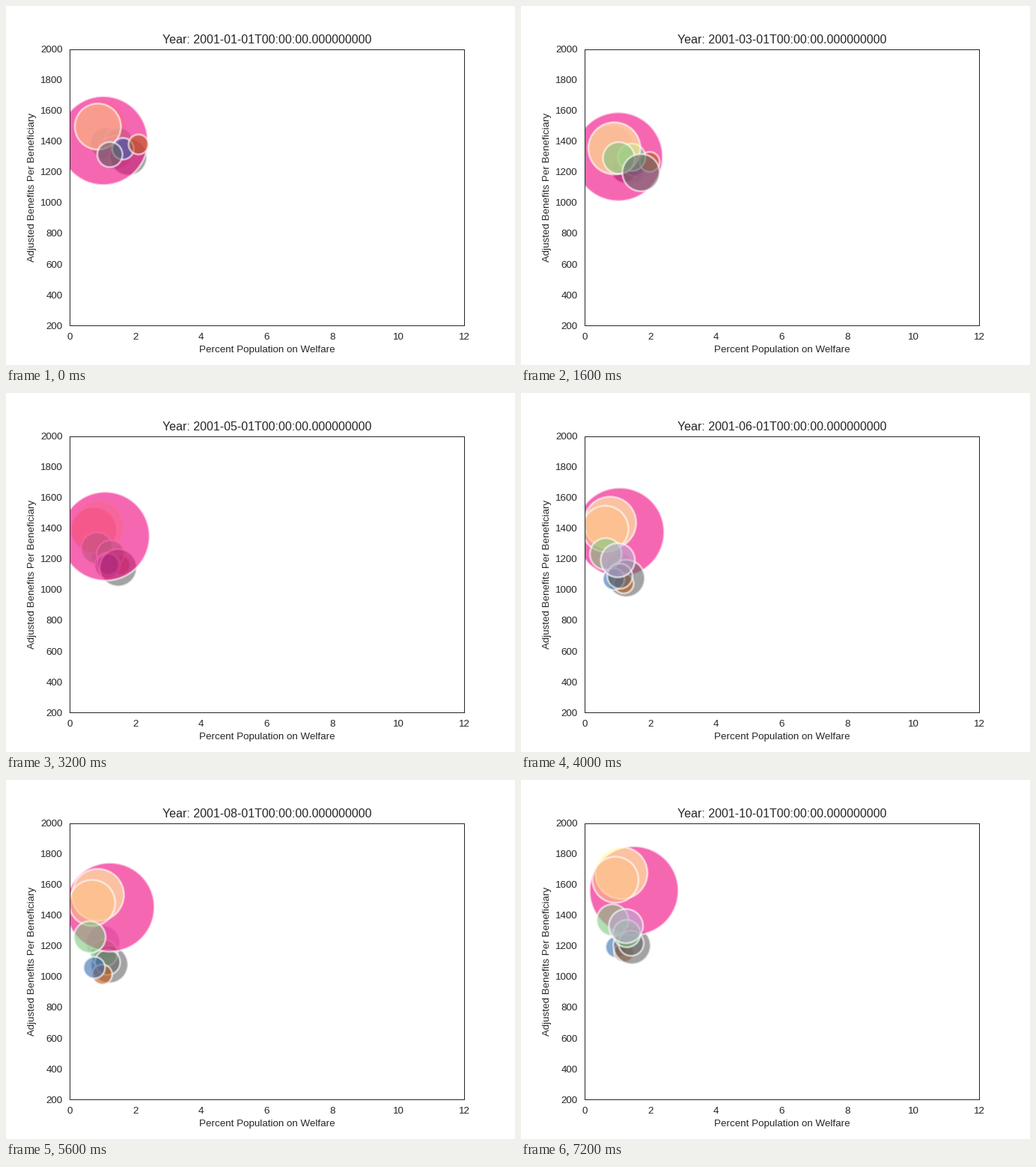
Animation, 680 px wide and 480 px high, one loop 8000 ms. Source, as a matplotlib script:

```python
import numpy as np
import matplotlib.pyplot as plt
from matplotlib.animation import FuncAnimation

W, H, DPI = 680, 480, 96
INK = "#262626"

plt.rcParams.update({
    "font.family": "Liberation Sans",
    "text.color": INK,
    "axes.labelcolor": INK,
    "axes.edgecolor": INK,
    "axes.linewidth": 0.75,
})

# key: radius, start (x, y), slide (dx, dy), share of the lead's vertical motion.
# Colours are spread over the Accent map in this order.
BUBBLES = {
    "G": (21.2, (134, 183), (-33, 30), 0.8),
    "H": (18.3, (151, 180), (-31, 51), 0.8),
    "V": (22.8, (146, 196), (-27, 25), 0.8),
    "O": (30.8, (123, 161), (-18, 14), 1.3),
    "Y": (34.8, (126, 162), (-13, 4), 1.3),
    "B": (14.4, (157, 190), (-51, 59), 0.8),
    "P": (59.4, (130, 180), (0, 0), 1.0),
    "N": (13.3, (178, 184), (-62, 72), 0.8),
    "K": (24.9, (164, 201), (-37, 46), 0.8),
    "D": (16.8, (139, 198), (-13, 46), 0.8),
}
COLORS = dict(zip(BUBBLES, plt.get_cmap("Accent")(np.linspace(0, 1, len(BUBBLES)))))

# Path of the largest bubble, which the others follow.
LEAD_MONTHS = [1, 2, 4, 6, 8, 9, 10]
LEAD_X = [130, 127, 133, 132, 139, 143, 151]
LEAD_Y = [180, 206, 197, 186, 170, 204, 148]

# Stacking per month, bottom to top.
ORDERS = [
    "YGHVKPOBND", "VDOBPNHYGK", "VDOBPNHYGK", "VYOGNHDBKP", "VYOGNHDBKP",
    "HPKNYOGBDV", "HPKNYOGBDV", "VKHDPYOGNB", "NBYOGHVKPD", "BNKPDYOGHV",
]

fig, ax = plt.subplots(figsize=(W / DPI, H / DPI), dpi=DPI)
ax.set(xlim=(0, 12), ylim=(200, 2000), yticks=range(200, 2001, 200))
ax.tick_params(length=0, pad=7, labelsize=10, labelcolor=INK)
ax.set_xlabel("Percent Population on Welfare", fontsize=10)
ax.set_ylabel("Adjusted Benefits Per Beneficiary", fontsize=10)
title = ax.set_title("", fontsize=12)
dots = ax.scatter([], [], alpha=0.6, edgecolors="white", linewidths=2)


def to_data(px, py):
    box = ax.get_position()
    x = 12 * (px / W - box.x0) / box.width
    y = 200 + 1800 * (1 - py / H - box.y0) / box.height
    return x, y


def centre(key, month):
    _, (x, y), (dx, dy), share = BUBBLES[key]
    lead_x = np.interp(month, LEAD_MONTHS, LEAD_X) - LEAD_X[0]
    lead_y = np.interp(month, LEAD_MONTHS, LEAD_Y) - LEAD_Y[0]
    slide = 1 / (1 + np.exp(5.2 - month))
    dip = 0.35 * np.exp(-((month - 7) / 1.5) ** 2)
    return to_data(x + lead_x + dx * slide,
                   y + share * lead_y + dy * (slide + dip))


def area(radius):
    return (2 * radius * 72 / DPI) ** 2


def update(i):
    month = i + 1
    order = ORDERS[i]
    dots.set_offsets([centre(key, month) for key in order])
    dots.set_sizes([area(BUBBLES[key][0]) for key in order])
    dots.set_facecolors([COLORS[key] for key in order])
    title.set_text(f"Year: 2001-{month:02d}-01T00:00:00.000000000")
    return dots, title


anim = FuncAnimation(fig, update, frames=len(ORDERS), interval=800,
                     init_func=lambda: update(0), repeat=True, repeat_delay=0)
plt.show()
```
